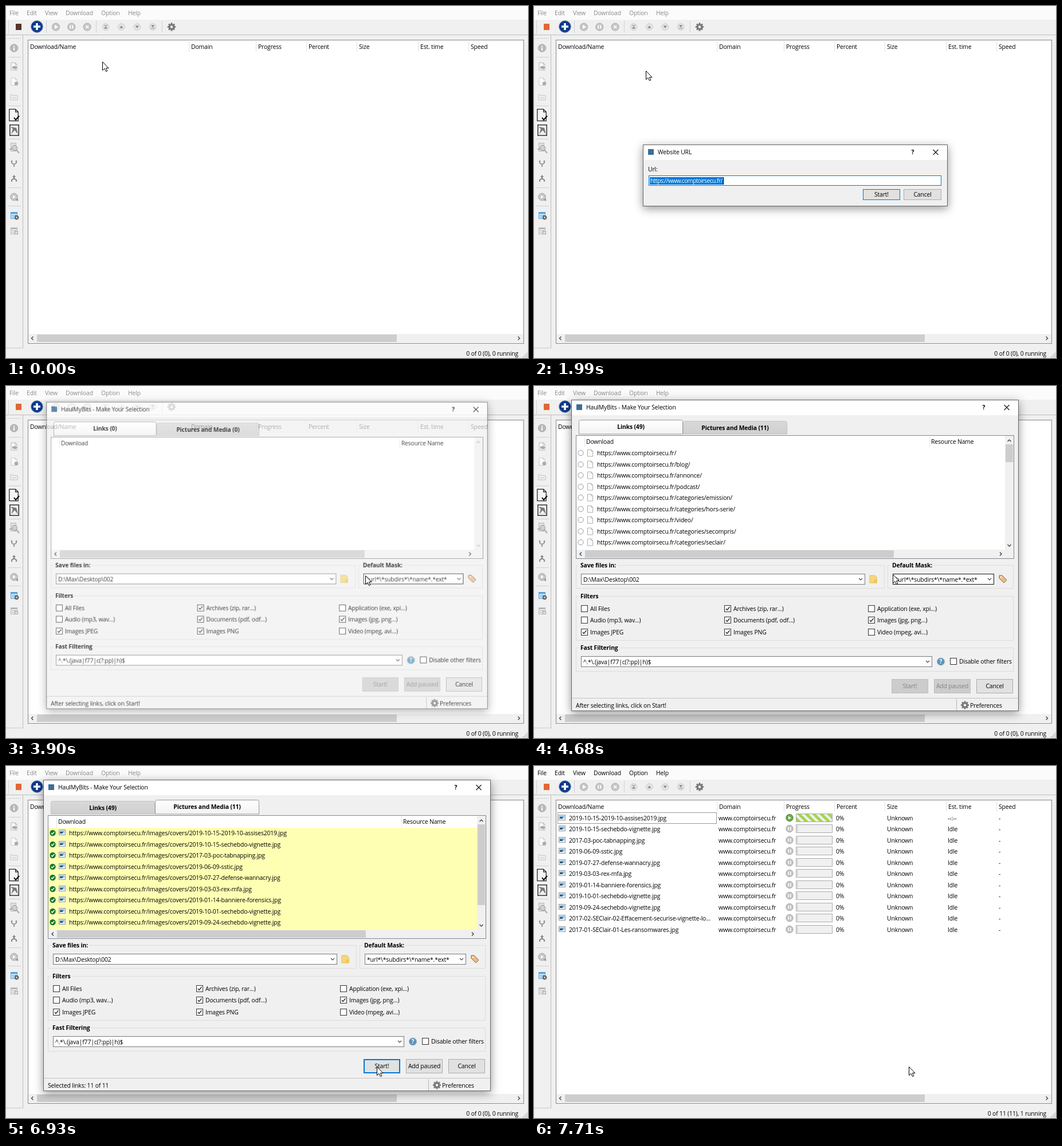
An HTML page with a canvas for the animation above (8 s loop, 911 by 615 pixels).

```html
<!DOCTYPE html>
<html lang="en">
<head>
<meta charset="utf-8">
<title>Download manager</title>
<style>
html, body { margin: 0; width: 100%; height: 100%; overflow: hidden; background: #f0f0f0; }
canvas { display: block; }
</style>
</head>
<body>
<canvas id="stage" width="911" height="615"></canvas>
<script>
const LOOP = 8000;
const stage = document.getElementById('stage').getContext('2d');
const layer = Object.assign(document.createElement('canvas'), { width: 911, height: 615 }).getContext('2d');
let g = stage, now = 0, mouse = [0, 0];

const site = 'https://www.comptoirsecu.fr/';
const links = ['', 'blog/', 'annonce/', 'podcast/', 'categories/emission/', 'categories/hors-serie/',
  'video/', 'categories/secompris/', 'categories/seclair/'];
const files = ['2019-10-15-2019-10-assises2019', '2019-10-15-sechebdo-vignette', '2017-03-poc-tabnapping',
  '2019-06-09-sstic', '2019-07-27-defense-wannacry', '2019-03-03-rex-mfa', '2019-01-14-banniere-forensics',
  '2019-10-01-sechebdo-vignette', '2019-09-24-sechebdo-vignette',
  '2017-02-SEClair-02-Effacement-securise-vignette-lo...', '2017-01-SEClair-01-Les-ransomwares']
  .map(name => name.endsWith('...') ? name : name + '.jpg');

// Pointer tip: time, x, y
const track = [[0, 168, 97], [940, 168, 97], [1400, 20, 33], [1680, 20, 33], [2520, 585, 292], [2840, 627, 331],
  [4600, 627, 331], [4680, 626, 329], [5310, 346, 65], [6180, 346, 65], [6930, 647, 525], [7600, 647, 525],
  [7710, 654, 525], [8000, 654, 525]];
const clicks = [[1600, 1740], [3310, 3390], [5610, 5760], [7010, 7080]];

const between = (a, b) => now >= a && now < b;
const clamp = v => Math.max(0, Math.min(1, v));
const easeOut = v => 1 - (1 - clamp(v)) ** 3;
const over = (x, y, w, h) => mouse[0] >= x && mouse[0] < x + w && mouse[1] >= y && mouse[1] < y + h;

function pointer() {
  const i = track.findIndex(k => k[0] > now), [a, b] = [track[i - 1], track[i]];
  let p = (now - a[0]) / (b[0] - a[0]);
  p = p * p * (3 - 2 * p);
  return [1, 2].map(n => Math.round(a[n] + (b[n] - a[n]) * p));
}

function text(s, x, y, color = '#000', align = 'left', weight = 400, spacing = -.15) {
  g.font = `${weight} 10.4px "Open Sans", "Noto Sans", sans-serif`;
  g.letterSpacing = spacing + 'px';
  g.textAlign = align;
  g.fillStyle = color;
  g.fillText(s, x, Math.floor(y + 4));
}

function rect(x, y, w, h, fill, stroke, line = 1) {
  if (fill) { g.fillStyle = fill; g.fillRect(x, y, w, h); }
  if (stroke) {
    g.strokeStyle = stroke; g.lineWidth = line;
    g.strokeRect(x + line / 2, y + line / 2, w - line, h - line);
  }
}

function disc(x, y, r, fill, stroke) {
  g.beginPath(); g.arc(x, y, r, 0, 7);
  if (fill) { g.fillStyle = fill; g.fill(); }
  if (stroke) { g.strokeStyle = stroke; g.lineWidth = 1; g.stroke(); }
}

function path(d, x, y, fill, stroke, line = 1) {
  g.save(); g.translate(x, y);
  const p = new Path2D(d);
  if (fill) { g.fillStyle = fill; g.fill(p); }
  if (stroke) { g.strokeStyle = stroke; g.lineWidth = line; g.stroke(p); }
  g.restore();
}

const chevrons = { left: 'M2-3L-1 0 2 3', right: 'M-2-3L1 0-2 3', up: 'M-3 2L0-1 3 2', down: 'M-3-2L0 1 3-2' };
const chevron = (dir, x, y, color = '#444', line = 1.4) => path(chevrons[dir], x, y, null, color, line);

function gear(x, y, r, color) {
  g.fillStyle = color;
  for (let i = 0; i < 4; i++) {
    g.save(); g.translate(x, y); g.rotate(i * Math.PI / 4);
    g.fillRect(-1.4, -r, 2.8, 2 * r); g.restore();
  }
  disc(x, y, r * .74, color);
  disc(x, y, r * .32, '#f0f0f0');
}

function page(x, y, color = '#b5b5b5', fill = '#f8f8f8', k = 1) {
  g.save(); g.translate(x, y); g.scale(k, k);
  path('M-5-6.5H2L5-3.5V6.5H-5ZM2-6.5V-3.5H5', 0, 0, fill, color, 1 / Math.sqrt(k));
  g.restore();
}

function picture(x, y) {
  rect(x, y, 12, 10, '#e8f0f5', '#8e9aa3');
  rect(x + 2, y + 2, 8, 4, '#8bbce0');
  rect(x + 2, y + 4, 5, 3, '#2c5878');
}

function button(label, x, y, w, h, { on = true, border = 0, hot = over(x, y, w, h) } = {}) {
  rect(x, y, w, h, on ? hot ? '#e5f1fb' : '#e1e1e1' : '#cccccc',
    on ? border || hot ? '#0078d7' : '#adadad' : '#bfbfbf', border || 1);
  text(label, x + w / 2, y + h / 2, on ? '#000' : '#838383', 'center');
}

function combo(value, x, y, w) {
  rect(x, y, w, 19, '#fff', over(x, y, w, 19) ? '#171717' : '#7a7a7a');
  text(value, x + 4, y + 10);
  chevron('down', x + w - 8, y + 10, '#444', 1.1);
}

function group(title, x, y, w, h) {
  rect(x, y, w, h, null, '#dcdcdc');
  g.font = '700 10.4px "Open Sans", "Noto Sans", sans-serif';
  rect(x + 5, y - 2, g.measureText(title).width + 5, 5, '#f0f0f0');
  text(title, x + 8, y, '#000', 'left', 700);
}

function check(label, x, y, on) {
  rect(x, y - 6, 12, 12, '#fff', '#333');
  if (on) path('M3 0L5 2.5 9.5-3', x, y, null, '#222', 1.3);
  text(label, x + 16, y + .5);
}

function frame(x, y, w, h, title) {
  g.save();
  g.shadowColor = 'rgba(0,0,0,.42)'; g.shadowBlur = 15; g.shadowOffsetY = 4;
  rect(x, y, w, h, '#f0f0f0');
  g.restore();
  rect(x, y, w, 27, '#fff');
  rect(x, y, w, h, null, '#666');
  rect(x + 9, y + 8, 10, 10, '#3d6e96');
  text(title, x + 26, y + 13.5);
  text('?', x + w - 61, y + 13.5, '#000', 'center', 700);
  path('M-4.5-4.5L4.5 4.5M4.5-4.5L-4.5 4.5', x + w - 21, y + 13.5, null, '#111', 1.1);
}

// Draws a window on its own layer, then blends it in with scale and opacity
function fadeWindow(amount, cx, cy, draw) {
  if (amount <= 0) return;
  layer.clearRect(0, 0, 911, 615);
  g = layer; draw(); g = stage;
  const s = .91 + .09 * amount;
  g.save();
  g.globalAlpha = amount * amount;
  g.translate(cx, cy); g.scale(s, s);
  g.drawImage(layer.canvas, -cx, -cy);
  g.restore();
}

function urlDialog() {
  frame(190, 242, 532, 108, 'Website URL');
  text('Url:', 199, 285);
  rect(200, 296, 511, 18, '#fff', '#0078d7');
  rect(202, 299, 129, 13, '#0078d7');
  text(site, 203, 305, '#fff', 'left', 400, -.6);
  rect(330, 299, 1, 13, '#000');
  button('Start!', 574, 320, 65, 19, { border: 1 });
  button('Cancel', 645, 320, 66, 19);
}

function tab(label, x, active) {
  const y = active ? 59.5 : 61.5;
  const fill = g.createLinearGradient(0, y, 0, 84);
  fill.addColorStop(0, active ? '#ffffff' : '#d9d9d9');
  fill.addColorStop(1, active ? '#f2f2f2' : '#cfcfcf');
  g.beginPath(); g.roundRect(x + .5, y, 181, 84 - y, [3, 3, 0, 0]);
  g.fillStyle = fill; g.fill();
  g.strokeStyle = active ? '#999' : '#c2c2c2'; g.lineWidth = 1; g.stroke();
  text(label, x + 91, active ? 71.5 : 73, '#000', 'center', 700);
}

function linkList(loaded, media) {
  rect(73, 86, 765, 216, '#fff', '#828790');
  if (over(88, 88, 602, 19)) rect(88, 87, 602, 20, '#d9ebf9');
  text('Download', 91, 97.5);
  text('Resource Name', 693, 97.5);
  rect(88, 88, 1, 19, '#e5e5e5');
  rect(690, 88, 1, 19, '#e5e5e5');
  if (media) rect(74, 108, 748, 178, '#ffffb3');
  if (loaded) for (let i = 0; i < 9; i++) {
    const y = Math.round(117 + i * 19.5);
    if (media) {
      disc(81.5, y, 5.2, '#167a26');
      path('M-2.5 0L-.7 2 2.7-2', 81.5, y, null, '#fff', 1.5);
      picture(92, y - 6);
      text(site + 'images/covers/' + files[i], 110, y);
    } else {
      disc(81.5, y, 4.7, '#fff', '#999');
      page(98, y, '#aaa', '#fafafa', .92);
      text(site + links[i], 110, y);
    }
  }
  rect(822, 87, 15, 199, '#f0f0f0');
  if (loaded) rect(823, 102, 13, media ? 141 : 31, '#cdcdcd');
  chevron('up', 829.5, 95, loaded ? '#444' : '#bbb');
  chevron('down', 829.5, 279, loaded ? '#444' : '#bbb');
  rect(74, 286, 763, 15, '#f0f0f0');
  rect(89, 287, 539, 13, '#cdcdcd');
  chevron('left', 81, 293.5);
  chevron('right', 815, 293.5);
}

// A leading plus marks a ticked box
const filters = {
  82: ['All Files', 'Audio (mp3, wav...)', '+Images JPEG'],
  332: ['+Archives (zip, rar...)', '+Documents (pdf, odf...)', '+Images PNG'],
  583: ['Application (exe, xpi...)', '+Images (jpg, png...)', 'Video (mpeg, avi...)']
};

function selectDialog() {
  const loaded = now >= 4060, media = now >= 5610;
  frame(65, 24, 781, 544, 'HaulMyBits - Make Your Selection');
  tab(`Links (${loaded ? 49 : 0})`, 78, !media);
  tab(`Pictures and Media (${loaded ? 11 : 0})`, 260, media);
  linkList(loaded, media);

  group('Save files in:', 73, 313, 539, 41);
  combo('D:\\Max\\Desktop\\002', 82, 328, 496);
  path('M0-6H9L12-3V7H0Z', 586, 337, '#f5d77b', '#dfbd59');
  rect(593, 338, 6, 6, '#efc65a');
  group('Default Mask:', 617, 313, 220, 41);
  combo('*url*\\*subdirs*\\*name*.*ext*', 626, 328, 177);
  path('M-6-6H-1L7 2 2 7-6-1Z', 818, 337, '#e9bc83', '#8c6742');
  disc(815, 334, 1.3, '#fff');

  group('Filters', 73, 367, 764, 78);
  for (const [x, column] of Object.entries(filters))
    column.forEach((label, row) =>
      check(label.replace('+', ''), +x, Math.round(389 + row * 20.4), label[0] == '+'));

  group('Fast Filtering', 73, 457, 764, 42);
  combo('^.*\\.(java|f77|c(?:pp)|h)$', 82, 472, 613);
  disc(710, 481.5, 6.5, '#5c93b8', '#9bb3c4');
  text('?', 710, 481.5, '#fff', 'center', 700);
  check('Disable other filters', 726, 481, false);

  button('Start!', 624, 512, 64, 25, { on: media, border: media ? 2 : 0, hot: now >= 6960 });
  button('Add paused', 698, 512, 64, 25, { on: media });
  button('Cancel', 772, 512, 64, 25);
  rect(66, 545, 779, 1, '#c4c4c4');
  rect(737, 547, 1, 20, '#b5b5b5');
  text(media ? 'Selected links: 11 of 11' : 'After selecting links, click on Start!', 73, 558.5);
  gear(752, 557.5, 7, '#777');
  text('Preferences', 761, 558.5);
}

function toolbar() {
  rect(0, 0, 911, 24, '#fbfbfb');
  const menuColor = between(1600, 1740) || now >= 7160 ? '#000' : '#8a8a8a';
  [['File', 6], ['Edit', 36], ['View', 68], ['Download', 104], ['Option', 166], ['Help', 213]]
    .forEach(([label, x]) => text(label, x, 12.5, menuColor));
  rect(0, 50, 911, 1, '#bdbdbd');
  for (let y = 26; y < 48; y += 3) rect(4, y, 1, 1, '#999');
  if (between(1340, 1740)) rect(8, 24, 28, 25, now >= 1600 ? '#cce4f7' : '#d8e6f2');
  rect(17, 31, 10, 11, now < 1600 ? '#573528' : '#df6736');

  disc(54, 36, 10.3, '#0b3b8c', '#6582b4');
  path('M-6 0H6M0-6V6', 54, 36, null, '#fff', 3.6);
  [70, 157, 272].forEach(x => rect(x, 26, 1, 21, '#d0d0d0'));
  ['M-2-3.5L4 0-2 3.5Z', 'M-3-3H-1V3H-3ZM1-3H3V3H1Z', 'M-3-2L-2-3 0-1 2-3 3-2 1 0 3 2 2 3 0 1-2 3-3 2-1 0Z']
    .forEach((d, i) => { disc(87 + i * 27.3, 36.5, 6.6, '#c6c6c6', '#adadad'); path(d, 87 + i * 27.3, 36.5, '#fff'); });
  ['M-3-3H3V-2H-3ZM0-1L3 3H-3Z', 'M0-2L3 2H-3Z', 'M0 2L3-2H-3Z', 'M-3 3H3V2H-3ZM0 1L3-3H-3Z']
    .forEach((d, i) => { disc(174 + i * 27.4, 36.5, 6, '#e2e2e2', '#d0d0d0'); path(d, 174 + i * 27.4, 36.5, '#858585'); });
  gear(289, 36.5, 7.2, '#777');
}

function sidebar() {
  for (let x = 3; x < 27; x += 3) rect(x, 56, 1, 1, '#999');
  rect(29, 51, 1, 547, '#bdbdbd');
  rect(0, 597, 30, 1, '#c8c8c8');
  [89, 174, 232, 317, 349].forEach(y => rect(4, y, 22, 1, '#cfcfcf'));

  disc(14, 73.5, 6.6, '#b9b9b9', '#a5a5a5');
  path('M-1-4H1V-2H-1ZM-1-1H1V4H-1Z', 14, 73.5, '#fff');
  page(14, 105.5);
  path('M-3-1H1V-3L6 1 1 5V3H-3Z', 14, 106.5, '#aaa');
  page(14, 132, '#ccc');
  disc(18, 135.5, 3.2, '#aaa');
  path('M-6-4H-2L-1-2.5H6V5H-6Z', 14, 159, '#eee', '#c2c2c2');
  rect(11, 160, 6, 1, '#c2c2c2');
  page(13.5, 190.5, '#222', '#f5f5f5', 1.55);
  path('M0 4L3 8 9 1', 14, 191, null, '#000', 2);
  rect(6, 207, 17, 20, '#eee', '#333', 1.5);
  path('M-6-6L4-4 7 7 1 0-5 7-2-2Z', 14, 217, '#777');
  rect(8, 239, 10, 15, '#e0e0e0', '#b8b8b8');
  disc(15, 248, 4.6, '#d0d0d0', '#9a9a9a');
  path('M3 3L8 9M-9 2H-3', 15, 248, null, '#aaa', 2);
  path('M-4-4V-1L0 2 4-1V-4M0 2V6', 14, 275, null, '#999', 2);
  path('M-6-3L-4-6-2-3ZM2-3L4-6 6-3Z', 14, 275, '#999');
  path('M-4 5V2L0-1 4 2V5M0-1V-5', 14, 302, null, '#888', 2);
  path('M-3-3L0-7 3-3Z', 14, 302, '#888');
  disc(14, 333.5, 6.3, '#c6c6c6', '#a8a8a8');
  path('M-2-3L3 0-2 3Z', 14, 333.5, '#fff');
  path('M2 5L7 2V7Z', 14, 334, '#999');
  [[366, '#4da0dc', '#d6ecfb'], [393, '#b5b5b5', '#eee']].forEach(([y, line, fill]) => {
    rect(8, y - 6, 12, 12, fill, line);
    rect(8, y - 6, 12, 3, line);
    [-1, 2].forEach(d => rect(10, y + d, 8, 1, line));
  });
  gear(18.5, 369.5, 3.8, '#666');
  rect(15, 393, 6, 6, '#ddd', '#aaa');
}

function queue() {
  files.forEach((name, i) => {
    const y = Math.round(91 + i * 19.45), first = i == 0;
    picture(43, y - 6);
    text(name, 61, y);
    text('www.comptoirsecu.fr', 322, y);
    disc(446, y - .5, 6.2, first ? '#6fa84f' : '#c4c4c4', first ? '#4c8a35' : '#aaa');
    path(first ? 'M-2-3L3 0-2 3Z' : 'M-2.5-3H-1V3H-2.5ZM1-3H2.5V3H1Z', 446, y - .5, '#fff');
    rect(457, y - 8, 64, 15, '#f0f0f0', '#aaa');
    if (first) {
      g.save();
      g.beginPath(); g.rect(458, y - 7, 62, 13); g.clip();
      for (let x = 446; x < 520; x += 13) path('M0 0H7L20 13H13Z', x, y - 7, '#a5d650');
      g.restore();
    } else rect(459, y - 6, 1, 11, '#bbb');
    text('0%', 527, y);
    text('Unknown', 616, y);
    text(first ? '--:--' : 'Idle', 722, y);
    text('-', 811, y);
  });
  g.setLineDash([1, 1]);
  rect(41, 81, 278, 20, null, '#333');
  g.setLineDash([]);
}

function mainWindow() {
  rect(0, 0, 911, 615, '#f0f0f0');
  toolbar();
  sidebar();
  rect(38, 59, 866, 531, '#fff', '#828790');
  [['Download/Name', 42], ['Domain', 323], ['Progress', 440], ['Percent', 528], ['Size', 616],
   ['Est. time', 723], ['Speed', 811]].forEach(([label, x], i) => {
    text(label, x, 71);
    if (i) rect(x - 4, 61, 1, 19, '#e2e2e2');
  });
  rect(39, 573, 864, 15, '#f0f0f0');
  rect(54, 574, 628, 13, '#cdcdcd');
  chevron('left', 45.5, 580.5);
  chevron('right', 895.5, 580.5);
  const started = now >= 7160;
  if (started) queue();
  text(started ? '0 of 11 (11), 1 running' : '0 of 0 (0), 0 running', 894, 607, '#000', 'right');
  for (let i = 0; i < 3; i++) for (let j = 0; j <= i; j++) rect(908 - j * 3, 606 + i * 3, 2, 2, '#bbb');
}

function draw() {
  mouse = pointer();
  g = stage;
  mainWindow();
  fadeWindow(now < 3390 ? easeOut((now - 1720) / 260) : 1 - clamp((now - 3390) / 200), 456, 296, urlDialog);
  fadeWindow(now < 7080 ? easeOut((now - 3760) / 300) : 1 - clamp((now - 7080) / 220), 456, 296, selectDialog);
  if (clicks.some(([a, b]) => between(a, b))) disc(mouse[0] + .5, mouse[1] + .5, 10, 'rgba(255,255,0,.47)');
  path('M.5.5V15.5L4 12.3 6.5 17.5 8.8 16.5 6.5 11.5H11Z', ...mouse, '#fff', '#000');
}

function tick(time) {
  now = time % LOOP;
  draw();
  requestAnimationFrame(tick);
}
requestAnimationFrame(tick);
</script>
</body>
</html>
```
